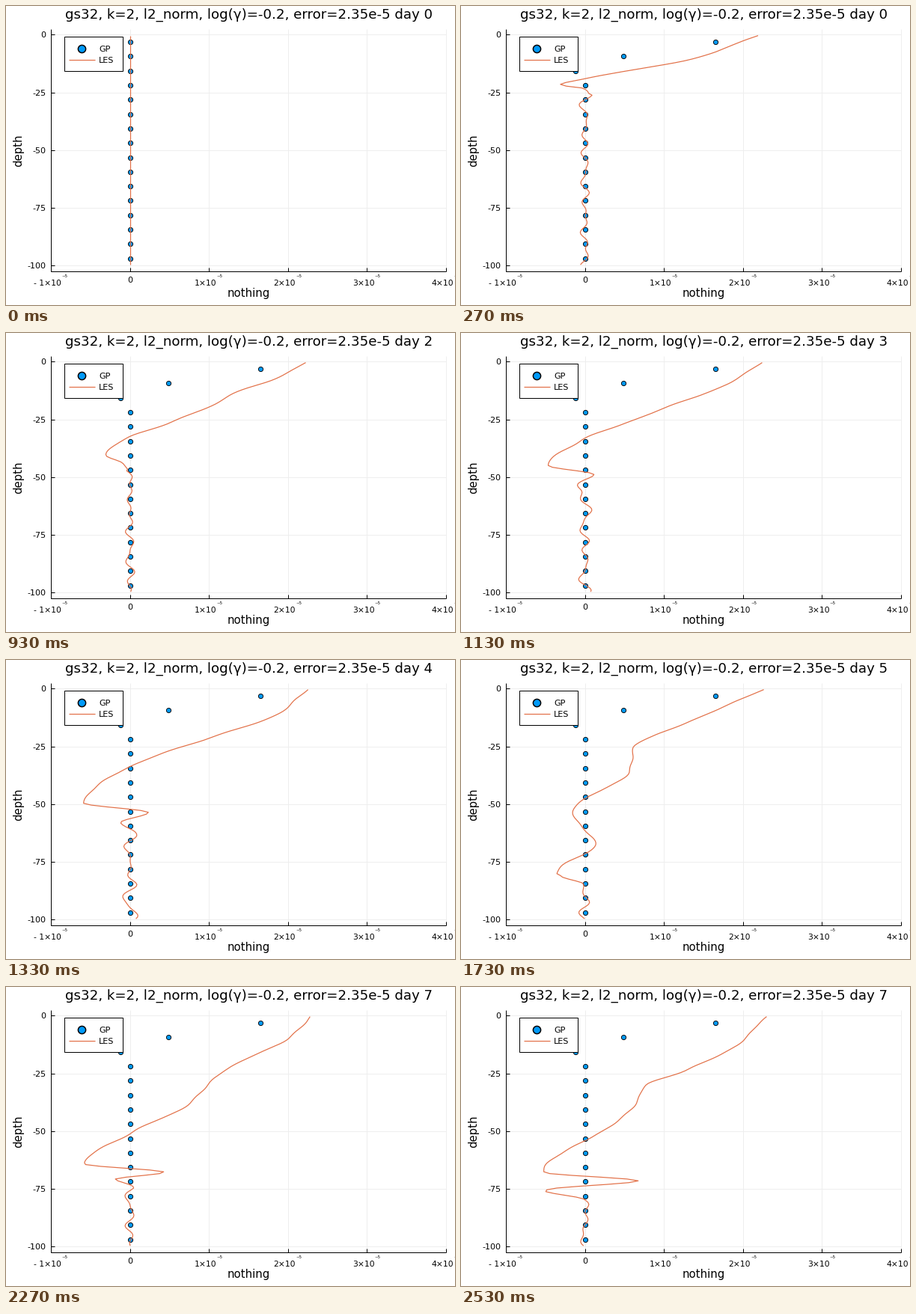
A matplotlib script for the animation above (2.59 s loop, 600 by 400 pixels).

```python
import numpy as np
import matplotlib.pyplot as plt
from matplotlib.animation import FuncAnimation
from matplotlib.patches import Rectangle

W, H, DPI = 600, 400, 100
TICK_MS, LOOP_MS = 10, 2590
STEPS_PER_SECOND = 15
HOURS_PER_STEP = 5

BLUE, ORANGE, GRID = "#009afa", "#e26f46", "#eeeeee"
LEFT, RIGHT, TOP, BOTTOM = 59.5, 588, 30.5, 354.5
X0, X_UNIT = 165.6, 105.5        # pixel of zero, pixels per 1e-5
Y0, Y_UNIT = 38.4, 3.09          # pixel of the surface, pixels per metre

plt.rcParams["font.family"] = "DejaVu Sans"

# Key points of the flux profile at a few steps: surface, five points down
# the mixed layer, entrainment minimum, rebound, tail.
STEPS = [8, 14, 20, 26, 31, 38]
DEPTHS = np.array([
    [0, 6.7, 11.3, 15.2, 21, 27, 30.7, 33, 36],
    [0, 8.2, 14.4, 18.6, 25.6, 32.7, 40.5, 44, 47],
    [0, 9.5, 14.5, 21.4, 29, 36, 49.5, 53.6, 58],
    [0, 8, 12.3, 20, 25.6, 36, 53, 67, 80.7],
    [0, 9.5, 16.5, 25.5, 36, 48.5, 61.5, 65, 67.5],
    [0, 10, 23.5, 30, 42.4, 52, 67.8, 71.5, 75.4]])
FLUXES = np.array([
    [2.22, 1.85, 1.62, 1.33, 0.67, 0, -0.31, -0.01, 0.03],
    [2.24, 1.79, 1.25, 1.07, 0.56, 0, -0.32, -0.08, -0.01],
    [2.27, 1.93, 1.63, 1.0, 0.33, -0.13, -0.6, 0.26, -0.12],
    [2.29, 1.75, 1.46, 0.9, 0.62, 0.56, -0.16, 0.12, -0.38],
    [2.27, 2.02, 1.5, 1.27, 0.86, 0.02, -0.6, 0.27, 0.02],
    [2.3, 2.03, 1.3, 0.78, 0.55, 0.1, -0.54, 0.67, -0.47]])

CELLS = (np.arange(128) + 0.5) * 100 / 128
GP_CELLS = (np.arange(16) + 0.5) * 100 / 16
GP_START = np.zeros(16)
GP_FIT = GP_START.copy()
GP_FIT[:3] = 1.652, 0.484, -0.118

rng = np.random.default_rng(4)
WAVES = 6
LENGTH = rng.uniform(6, 18, WAVES)
PHASE = rng.uniform(0, 2 * np.pi, WAVES)
DRIFT = rng.uniform(-0.6, 0.6, WAVES)


def px_x(flux):
    return X0 + X_UNIT * flux


def px_y(depth):
    return Y0 + Y_UNIT * depth


def smooth_curve(xs, ys, x):
    """Cubic through the points without overshoot."""
    h = np.diff(xs)
    d = np.diff(ys) / h
    slope = np.zeros_like(ys)
    same = d[:-1] * d[1:] > 0
    a, b = d[:-1][same], d[1:][same]
    slope[1:-1][same] = 2 * a * b / (a + b)
    slope[0] = d[0]
    i = np.clip(np.searchsorted(xs, x) - 1, 0, len(h) - 1)
    t = (x - xs[i]) / h[i]
    bend = (1 - t) * slope[i] - t * slope[i + 1]
    return ys[i] + h[i] * (t * d[i] + t * (1 - t) * (bend - (1 - 2 * t) * d[i]))


def turbulence(step, base):
    """Drifting ripples, weaker inside the mixed layer."""
    angle = 2 * np.pi * CELLS[:, None] / LENGTH + PHASE + DRIFT * step
    return np.sin(angle).sum(axis=1) * np.where(CELLS < base, 0.007, 0.024)


def between_keys(table, step):
    return np.array([np.interp(step, STEPS, column) for column in table.T])


def les_profile(step):
    if step == 0:
        return np.zeros_like(CELLS)
    growth = min(1, np.sqrt(step / STEPS[0]))
    depth = between_keys(DEPTHS, step) * growth
    flux = between_keys(FLUXES, step)
    depth = np.append(depth, [depth[-1] + 4, 100])
    flux = np.append(flux, [0, 0])
    return smooth_curve(depth, flux, CELLS) + turbulence(step, depth[8])


fig = plt.figure(figsize=(W / DPI, H / DPI), dpi=DPI, facecolor="white")
ax = fig.add_axes([0, 0, 1, 1])
ax.set_xlim(0, W)
ax.set_ylim(H, 0)
ax.axis("off")


def pt(pixels):
    return pixels * 72 / DPI


def label(x, y, text, size, ha="center", **kw):
    return ax.text(x, y, text, fontsize=pt(size), ha=ha, va="baseline",
                   color="black", **kw)


def stroke(xs, ys, color="black", width=1.0, z=1):
    return ax.plot(xs, ys, color=color, lw=pt(width), zorder=z,
                   solid_capstyle="butt")[0]


def dots(xs, ys, size, edge, z):
    return ax.plot(xs, ys, "o", ms=pt(size), mfc=BLUE, mec="black",
                   mew=pt(edge), zorder=z)[0]


# Grid, axes and tick labels
for n in range(-1, 5):
    x = px_x(n)
    stroke([x, x], [TOP, BOTTOM], GRID, z=0)
    stroke([x, x], [BOTTOM, BOTTOM - 5])
    if n == 0:
        label(x, 369.6, "0", 11.1)
        continue
    sign, split = ("- ", 14) if n < 0 else ("", 10.5)
    label(x + split, 374, f"{sign}{abs(n)}×10", 10.7, ha="right")
    label(x + split, 366, "⁻⁵", 8.6, ha="left")
for depth in range(0, 101, 25):
    y = px_y(depth)
    stroke([LEFT, RIGHT], [y, y], GRID, z=0)
    stroke([LEFT, LEFT + 5], [y, y])
    label(53.7, y + 4, str(-depth), 11.1, ha="right")
stroke([LEFT, LEFT], [TOP, BOTTOM])
stroke([LEFT, RIGHT], [BOTTOM, BOTTOM])
label(324, 388.7, "nothing", 14.9)
label(21.3, 193, "depth", 14.9, rotation=90, rotation_mode="anchor")

# Data
gp = dots(px_x(GP_START), px_y(GP_CELLS), 6.2, 0.9, 2)
les = stroke(px_x(np.zeros_like(CELLS)), px_y(CELLS), ORANGE, 1.2, 3)

# Legend
ax.add_patch(Rectangle((77.5, 40.5), 78, 46, fc="white", ec="black",
                       lw=pt(1), zorder=4))
dots([101.2], [56.5], 10.2, 1.5, 5)
stroke([84, 119], [71.5, 71.5], ORANGE, 1.2, 5)
label(124, 60.7, "GP", 11.1, ha="left", zorder=5)
label(124, 75.7, "LES", 11.1, ha="left", zorder=5)

title = label(324.4, 17.2, "", 18.25)
HEADING = "gs32, k=2, l2_norm, log(γ)=-0.2, error=2.35e-5 day {}"


def draw(tick):
    step = int((tick + 0.5) * TICK_MS * STEPS_PER_SECOND / 1000)
    title.set_text(HEADING.format(step * HOURS_PER_STEP // 24))
    gp.set_xdata(px_x(GP_FIT if step else GP_START))
    les.set_xdata(px_x(les_profile(step)))
    return title, gp, les


anim = FuncAnimation(fig, draw, frames=LOOP_MS // TICK_MS, interval=TICK_MS,
                     repeat=True, repeat_delay=0, blit=False)
plt.show()
```
